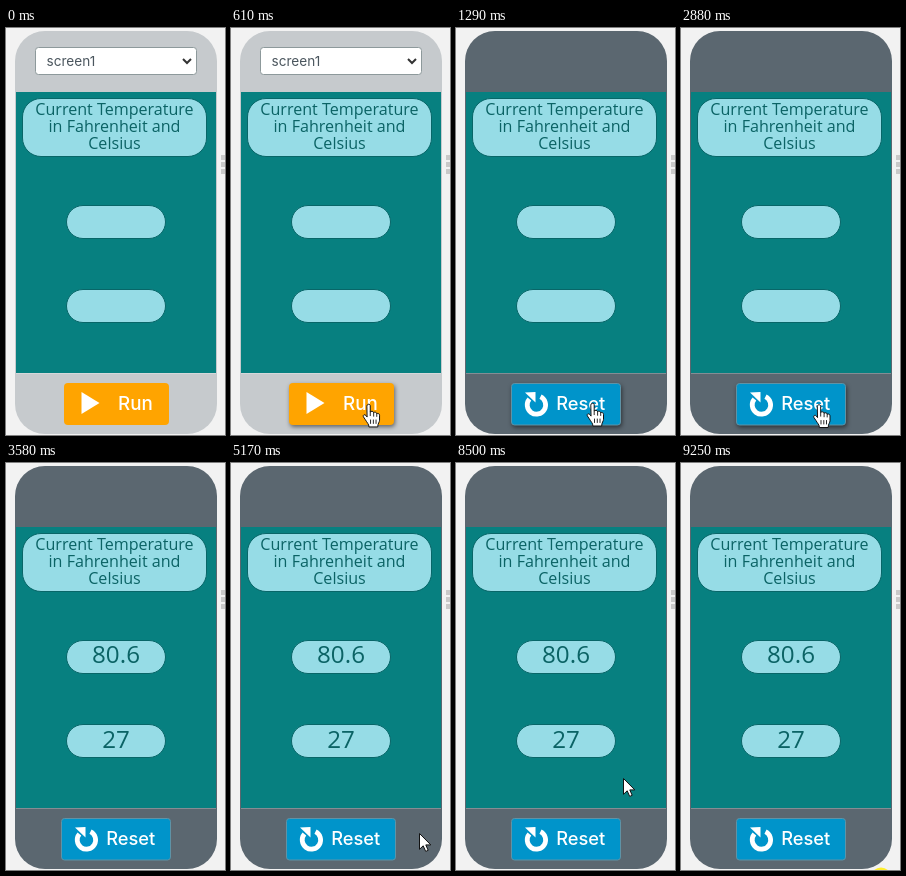
Write an HTML page that moves like this. It is 219x407 px and loops after 9380 ms.

```html
<!DOCTYPE html>
<html lang="en">
<head>
<meta charset="utf-8">
<title>Temperature app</title>
<style>
  html, body { margin: 0; width: 100%; height: 100%; overflow: hidden; background: #f2f2f2; }
  svg { display: block; width: 100%; height: 100%; }
  text { font-family: "Open Sans", sans-serif; font-weight: 500; }
  .label { font-size: 16.1px; fill: #0b6365; text-anchor: middle; }
  .value { font-size: 24.2px; fill: #0b6365; text-anchor: middle; }
  .button { font: 500 18.3px Inter, sans-serif; fill: #fff; }
  .hover { filter: drop-shadow(1.5px 2px 2px rgba(0, 0, 0, .5)); }
  .pill { fill: #96dce6; stroke: #086668; }
</style>
</head>
<body>
<svg viewBox="0 0 219 407">
  <rect width="219" height="407" fill="#f2f2f2"/>
  <g fill="#c9c9c9">
    <rect x="215" y="127" width="5" height="5"/>
    <rect x="215" y="134" width="5" height="5"/>
    <rect x="215" y="141" width="5" height="5"/>
  </g>
  <rect id="body" x="9" y="3" width="202" height="403" rx="30"/>
  <rect x="10" y="64" width="200" height="281" fill="#078080"/>
  <path d="M10 345.5H210" stroke="#fff" stroke-opacity=".25"/>

  <g id="select">
    <rect x="29.5" y="19.5" width="161" height="27" rx="3" fill="#fff" stroke="#8d999b"/>
    <text x="40.5" y="38" style="font:13.6px Inter,sans-serif" fill="#4b565e">screen1</text>
    <path d="M177 31l4 4 4-4" fill="none" stroke="#333" stroke-width="2"/>
  </g>

  <rect class="pill" x="16.5" y="70.5" width="184" height="58" rx="18.5"/>
  <text class="label" x="108.5" y="87">Current Temperature</text>
  <text class="label" x="108.5" y="104">in Fahrenheit and</text>
  <text class="label" x="108.5" y="121">Celsius</text>
  <rect class="pill" x="60.5" y="177.5" width="99" height="33" rx="16.5"/>
  <rect class="pill" x="60.5" y="261.5" width="99" height="33" rx="16.5"/>
  <g id="values">
    <text class="value" x="110" y="200">80.6</text>
    <text class="value" x="110" y="285">27</text>
  </g>

  <g id="run">
    <rect x="58" y="355" width="105" height="42" rx="4" fill="#ffa400"/>
    <rect id="focus" x="58.5" y="355.5" width="104" height="41" rx="4" fill="none" stroke="#b08a45"/>
    <path d="M75.5 364V386L93.5 375Z" fill="#fff"/>
    <text class="button" x="112" y="382" style="font-size:18.8px">Run</text>
  </g>
  <g id="reset">
    <rect x="55.5" y="355.5" width="109" height="41.5" rx="3" fill="#0094ca" stroke="#5f93a6"/>
    <path d="M84.5 368.7A9.2 9.2 0 1 1 73.4 371" fill="none" stroke="#fff" stroke-width="4.8"/>
    <path d="M69 364.5L79.5 364V374.5Z" fill="#fff"/>
    <text class="button" x="100.2" y="382.3">Reset</text>
  </g>

  <circle id="spot" cx="200" cy="415" r="10.5" fill="#ffee2e"/>
  <path id="arrow" d="M.5 .5V16.3L4.2 12.8L6.7 18.4L9.2 17.3L6.8 11.9H11.8Z" fill="#fff" stroke="#111" stroke-linejoin="round"/>
  <g id="hand" stroke="#111" stroke-linejoin="round" stroke-linecap="round">
    <path d="M-1.7 1.3C-1.7-.8 1.7-.8 1.7 1.3V7.6C2.2 6.4 5 6.6 5.1 8.2C6 7.3 8 7.7 8.2 9.2C9.3 8.6 11 9.2 11 10.8V15.8C11 17.8 9.2 18.8 9.2 22.5H.4C.4 19.7-1.6 18.2-3.2 15.3L-5.2 12.3C-6 10.4-3.7 9.6-2.7 11L-1.7 12.3Z" fill="#fff"/>
    <path d="M1.7 7.6V11.2M5.1 8.3V11.8M8.2 9.3V12M2 15.5V19M4.8 15.5V19M7.5 15.5V19" fill="none" stroke-width=".9"/>
  </g>
</svg>
<script>
const LOOP = 9380;
const $ = id => document.getElementById(id);
const show = (id, on) => $(id).setAttribute('display', on ? 'inline' : 'none');
const place = (id, p) => $(id).setAttribute('transform', `translate(${p[0]} ${p[1]})`);

// Each trip: start, end, steps, from, to, whether the pointer stays, easing
const trips = [
  { t0: 330, t1: 680, steps: 6, a: [163, 399], b: [136.5, 375.5], stay: true, ease: k => 1 - (1 - k) ** 2 },
  { t0: 2880, t1: 3380, steps: 8, a: [138, 377], b: [190, 412], stay: false, ease: k => k ** 1.3 },
  { t0: 5170, t1: 5440, steps: 4, a: [188, 370], b: [158, 300], stay: true, ease: k => 1 - (1 - k) ** 1.6 },
  { t0: 8500, t1: 8850, steps: 6, a: [167, 315], b: [200, 412], stay: false, ease: k => k }
];

function pointer(t) {
  const trip = trips.filter(m => t >= m.t0).pop();
  if (!trip) return null;
  const { t0, t1, steps, a, b, stay, ease } = trip;
  if (t >= t1) return stay ? b : null;
  const k = ease(Math.floor((t - t0) / (t1 - t0) * (steps - 1)) / (steps - 1));
  return a.map((v, i) => v + (b[i] - v) * k);
}

function draw(t) {
  const running = t >= 1290;
  const p = pointer(t);
  const [left, right] = running ? [55, 165] : [58, 163];
  const over = !!p && p[0] > left && p[0] < right && p[1] > 355 && p[1] < 397;

  $('body').setAttribute('fill', running ? '#5b6770' : '#c6cacd');
  show('select', !running);
  show('run', !running);
  show('reset', running);
  show('focus', t >= 1010);
  show('values', t >= 3580);
  show('spot', t >= 9250);
  for (const id of ['run', 'reset']) $(id).classList.toggle('hover', over);

  show('hand', over);
  show('arrow', p && !over);
  if (p) place(over ? 'hand' : 'arrow', p);
}

const start = performance.now();
function tick() {
  draw((performance.now() - start) % LOOP);
  requestAnimationFrame(tick);
}
tick();
</script>
</body>
</html>
```
